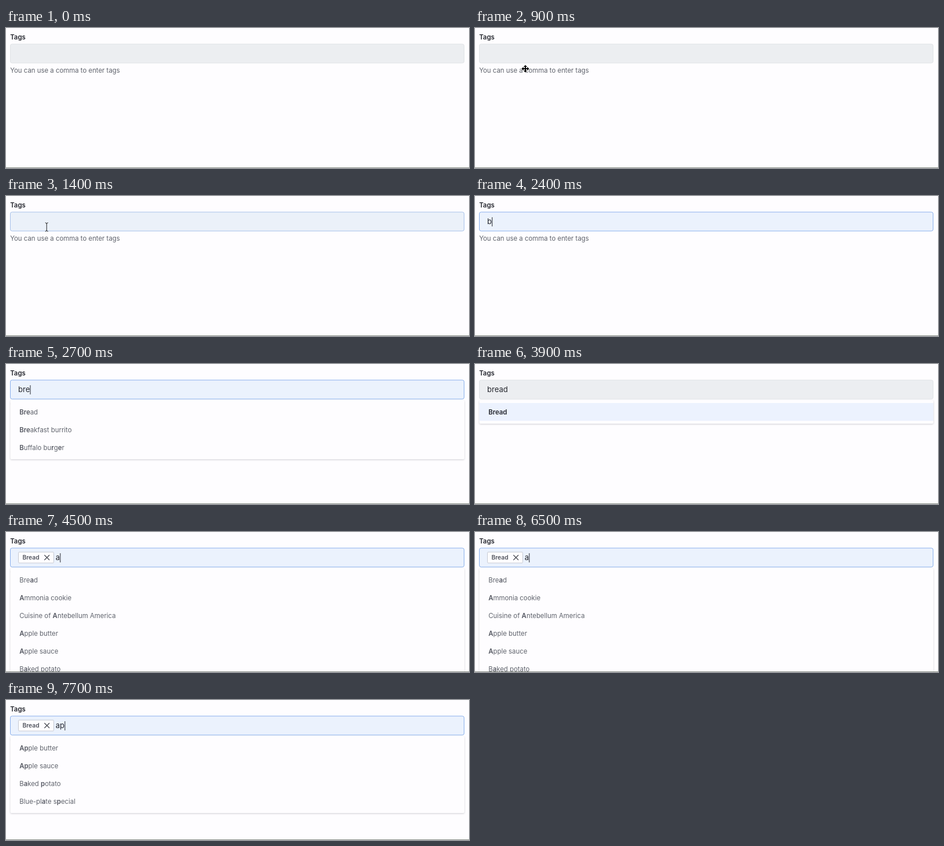
An HTML page for the animation above (8000 ms loop, 800x244 px).

```html
<!DOCTYPE html>
<html lang="en">
<head>
<meta charset="utf-8">
<title>Tag input</title>
<style>
  html, body { margin: 0; width: 100%; height: 100%; overflow: hidden; background: #fefdff; }
  svg { display: block; width: 800px; height: 244px; }
  text { font: 400 11.4px Inter, sans-serif; fill: #60646d; white-space: pre; }
  .label { font-weight: 600; fill: #23252d; }
  .typed { font-size: 13.05px; fill: #25272e; }
  .chip text { font-size: 10.3px; font-weight: 600; fill: #50535c; }
  .panel { fill: #fefdff; filter: drop-shadow(0 1px 1.5px rgba(30, 35, 50, .22)); }
  .hit { font-weight: 600; fill: #555862; }
  .active .hit { fill: #23252d; }
</style>
</head>
<body>
<svg viewBox="0 0 800 244">
  <text class="label" x="7.2" y="20.3">Tags</text>
  <text x="7.2" y="78">You can use a comma to enter tags</text>

  <g id="menu">
    <rect id="panel" class="panel" x="7.5" y="63" width="784.5" rx="2"/>
    <rect id="band" x="7.5" y="68" width="784.5" height="31" fill="#ecf2fe"/>
    <g id="items"></g>
  </g>

  <rect id="field" x="7.5" y="28" width="784" height="33" rx="3"/>
  <g id="chip" class="chip">
    <rect x="21.5" y="35" width="61" height="19" rx="1.5" fill="#fefdff" stroke="#c6cad3"/>
    <text x="28.4" y="48.2">Bread</text>
    <path d="M66.7 40.5l8 8m0-8l-8 8" stroke="#454850" stroke-width="1.2" stroke-linecap="round"/>
  </g>
  <text id="typed" class="typed" y="49.2"></text>
  <rect id="caret" y="37" width="1" height="16" fill="#25272e"/>

  <path id="move" stroke="#fff" stroke-width="1.4" paint-order="stroke"
    d="M0-6.6L3.2-3.2H1.1V-1.1H3.2V-3.2L6.6 0L3.2 3.2V1.1H1.1V3.2H3.2L0 6.6L-3.2 3.2H-1.1V1.1H-3.2V3.2L-6.6 0L-3.2-3.2V-1.1H-1.1V-3.2H-3.2Z"/>
  <path id="beam" fill="none" stroke="#222" d="M-2.5-7.5Q0-7.5 0-5.5Q0-7.5 2.5-7.5M0-6V6M-2.5 7.5Q0 7.5 0 5.5Q0 7.5 2.5 7.5"/>
  <rect y="243" width="800" height="1" fill="#868c84"/>
</svg>
<script>
const LOOP = 8000, TICK = 100, BLINK = 500, ROW = 31;

const foods = [
  'Bread', 'Ammonia cookie', 'Cuisine of Antebellum America', 'Apple butter',
  'Apple sauce', 'Baked potato', 'Blue-plate special', 'Biscuits and gravy',
  'Boiled dinner', 'Breakfast burrito', 'Buffalo burger'
];

// time, typed text, menu query, caret active
const steps = [
  [0, '', '', false],
  [1500, '', '', true],
  [2400, 'b', '', true],
  [2500, 'b', 'b', true],
  [2600, 'br', 'br', true],
  [2700, 'bre', 'bre', true],
  [2800, 'brea', 'brea', true],
  [3000, 'bread', 'bread', true],
  [3700, 'bread', 'bread', false],
  [4100, '', '', false],
  [4300, '', '', true],
  [4500, 'a', 'a', true],
  [6700, 'ap', 'a', true],
  [6800, 'ap', 'ap', true]
];

// time, x, y of the mouse
const mouse = [
  [400, 121, 172.5], [500, 117, 126.5], [600, 117, 126.5], [900, 87, 71],
  [1100, 74, 56], [1500, 69, 53.5], [1900, 67, 53.5], [2300, 67, 53.5]
];

// time, focus amount
const focusKeys = [[0, 0], [1200, 0], [1500, 1], [3600, 1], [3900, 0], [4000, 0], [4300, 1], [LOOP, 1]];

const $ = id => document.getElementById(id);
const show = (id, on) => $(id).style.display = on ? '' : 'none';

function svg(tag, attrs, parent) {
  const el = document.createElementNS('http://www.w3.org/2000/svg', tag);
  for (const key in attrs) el.setAttribute(key, attrs[key]);
  return parent.appendChild(el);
}

function sample(keys, t) {
  const i = keys.findIndex(k => k[0] > t);
  if (i < 1) return keys[i ? keys.length - 1 : 0].slice(1);
  const a = keys[i - 1], b = keys[i], p = (t - a[0]) / (b[0] - a[0]);
  return a.slice(1).map((v, n) => v + (b[n + 1] - v) * p);
}

const mix = (a, b, p) => `rgb(${a.map((v, i) => Math.round(v + (b[i] - v) * p))})`;

// Letters of the query in order; returns runs of [text, hit], or null
function match(name, query) {
  const runs = [];
  let n = 0;
  for (const ch of name) {
    const hit = n < query.length && ch.toLowerCase() === query[n];
    if (hit) n++;
    const last = runs[runs.length - 1];
    if (last && last[1] === hit) last[0] += ch;
    else runs.push([ch, hit]);
  }
  return n === query.length ? runs : null;
}

let shownQuery;
function drawMenu(query) {
  if (query === shownQuery) return;
  shownQuery = query;
  show('menu', query);
  const found = query ? foods.map(f => match(f, query)).filter(Boolean) : [];
  $('items').replaceChildren();
  found.forEach((runs, i) => {
    const line = svg('text', { x: 23.2, y: 88 + i * ROW }, $('items'));
    for (const [text, hit] of runs)
      svg('tspan', hit ? { class: 'hit' } : {}, line).textContent = text;
  });
  $('panel').setAttribute('height', 10 + found.length * ROW);
}

function drawMouse(t) {
  const on = t >= mouse[0][0] && t < 2300;
  const [x, y] = sample(mouse, t);
  const inField = y < 61;
  show('move', on && !inField);
  show('beam', on && inField);
  $(inField ? 'beam' : 'move').setAttribute('transform', `translate(${x} ${y})`);
}

function render(now) {
  const t = Math.floor(now % LOOP / TICK) * TICK;
  let i = steps.length - 1;
  while (steps[i][0] > t) i--;
  const [, typed, query, active] = steps[i];
  while (i && steps[i - 1][1] === typed && steps[i - 1][3] === active) i--;

  const [focus] = sample(focusKeys, t);
  $('field').style.fill = mix([236, 238, 241], [235, 242, 253], focus);
  $('field').style.stroke = mix([224, 227, 230], [138, 176, 236], focus);

  drawMenu(query);
  const picked = query && !active;
  show('band', picked);
  $('items').setAttribute('class', picked ? 'active' : '');

  const tagged = t >= 4100, left = tagged ? 85.8 : 21;
  show('chip', tagged);
  $('typed').setAttribute('x', left);
  if ($('typed').textContent !== typed) $('typed').textContent = typed;
  const width = typed ? $('typed').getComputedTextLength() : 0;
  $('caret').setAttribute('x', left + width + .2);
  show('caret', active && Math.floor((t - steps[i][0]) / BLINK) % 2 === 0);

  drawMouse(t);
}

const start = performance.now();
function loop() {
  render(performance.now() - start);
  requestAnimationFrame(loop);
}
loop();
</script>
</body>
</html>
```
